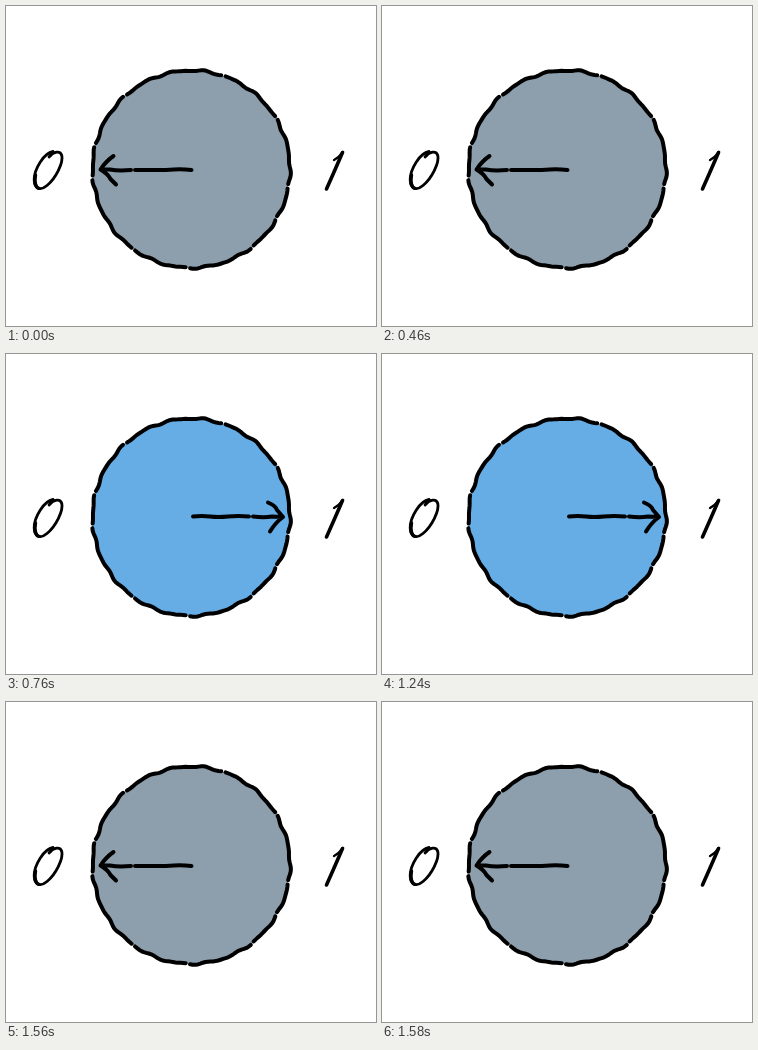
An HTML page that plays this animation: 370x320 px, repeating every 1.6 s.

```html
<!DOCTYPE html>
<html lang="en">
<head>
<meta charset="utf-8">
<title>Bit switch</title>
<style>
  html, body { margin: 0; width: 100%; height: 100%; overflow: hidden; background: #fff; }
  svg { display: block; width: 100vw; height: 100vh; }
</style>
</head>
<body>
<svg viewBox="0 0 370 320" fill="none" stroke="#000" stroke-linecap="round" stroke-linejoin="round">
  <path id="disc" stroke="none"/>
  <path id="rim" stroke-width="4"/>
  <g role="img" aria-label="0" stroke-width="2.8">
    <path d="M47 145.5C38 147 28 163 28.2 174C28.4 183.5 35 184.6 41 179.5C50 172 57.5 156.500 55.800 149.500C54.300 144.500 48 145 43 151"/>
    <path d="M29.500 169C28.200 176 29.500 181.500 33 182.300" stroke-width="3.400"/>
  </g>
  <g role="img" aria-label="1">
    <path d="M328 154Q333 151.500 337 146" stroke-width="2.400"/>
    <path d="M336.500 146.500Q329 164 320.500 183" stroke-width="3.600"/>
  </g>
  <path id="arrow" stroke-width="4"/>
</svg>
<script>
const LOOP = 1600, ON = 760, OFF = 1560;
const CX = 185.3, CY = 163.2, R = 98.7;
const $ = id => document.getElementById(id);
const disc = $('disc'), rim = $('rim'), arrow = $('arrow');

// Angles, in degrees, where the pen was lifted
const lifts = [-132, -71, -31, 10, 30, 52, 92, 126, 175, 194, 228];

function point(deg) {
  const a = deg * Math.PI / 180;
  const r = R + 0.65 * Math.sin(21 * a + 0.6) + 0.35 * Math.sin(34 * a);
  return (CX + r * Math.cos(a)).toFixed(2) + ' ' + (CY + r * Math.sin(a)).toFixed(2);
}

function arc(from, to) {
  const steps = Math.ceil((to - from) / 1.5), pts = [];
  for (let i = 0; i <= steps; i++) pts.push(point(from + (to - from) * i / steps));
  return 'M' + pts.join('L');
}

disc.setAttribute('d', arc(0, 360) + 'Z');
rim.setAttribute('d', lifts.slice(1).map((end, i) => arc(lifts[i] + 1.3, end - 1.3)).join(''));

const states = {
  off: {
    fill: '#8d9eac',
    d: 'M185.500 164Q176 163 168 163.500T151 164T129 164M125 164Q112 165 104 163.500L95 163.500M107.500 150Q100 155 94.500 163.500Q102 168 104.500 173L110 178.500'
  },
  on: {
    fill: '#66ade6',
    d: 'M187 162.500Q196 161.500 204 162.500T222 162.500T243 162.500M247 162.500Q258 164 266 162.500L276 163M262 148.500Q270 152 271 156L277 163Q269 169 264 177.500'
  }
};

let shown;
function draw(ms) {
  const t = ms % LOOP;
  const next = t >= ON && t < OFF ? states.on : states.off;
  if (next === shown) return;
  shown = next;
  disc.setAttribute('fill', next.fill);
  arrow.setAttribute('d', next.d);
}

const start = performance.now();
function tick() {
  draw(performance.now() - start);
  requestAnimationFrame(tick);
}
tick();
</script>
</body>
</html>
```
